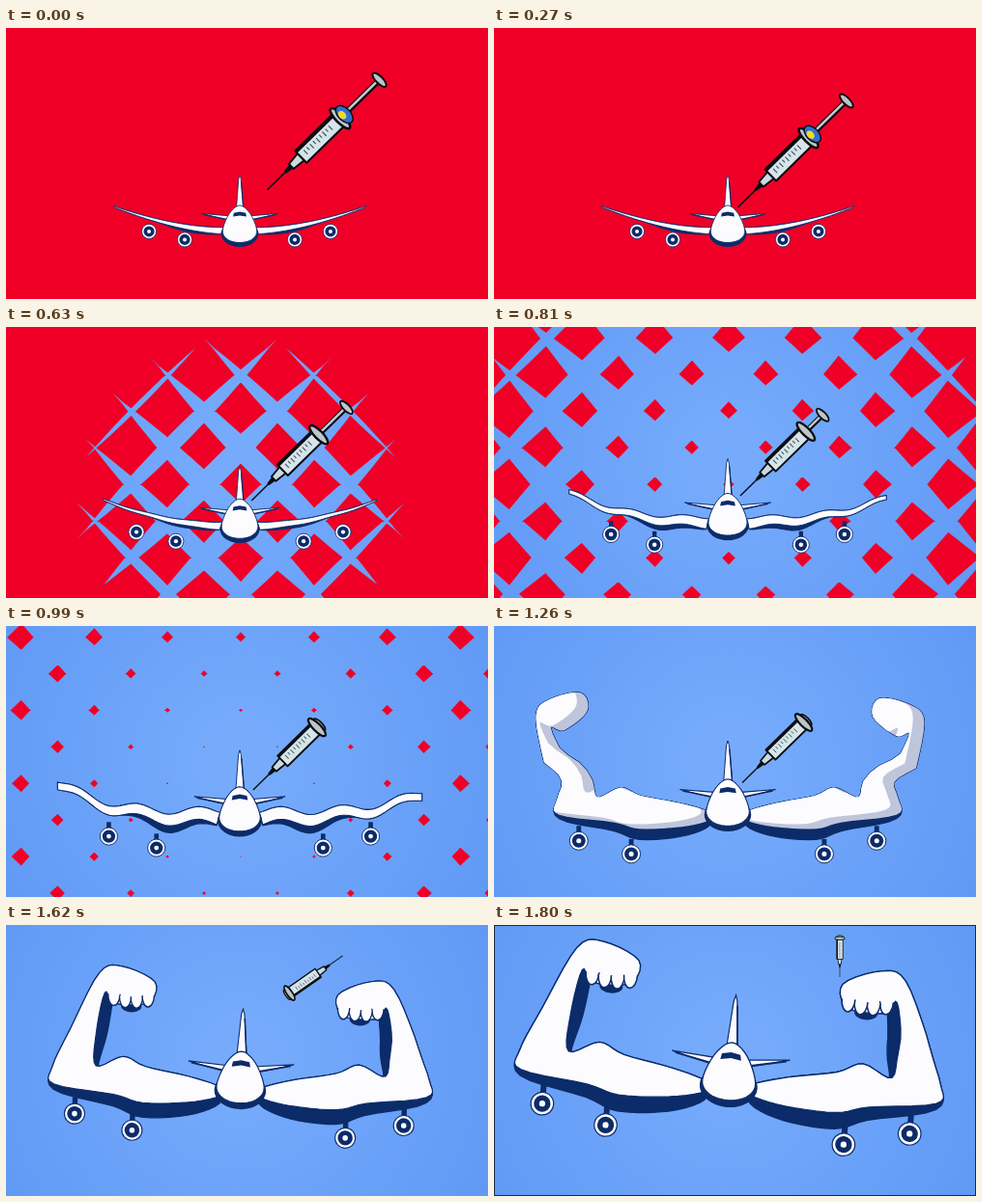
Recreate the animation shown at these times as an HTML page with a canvas. Size 499 by 281 pixels, loop 1890 ms.

```html
<!DOCTYPE html>
<html lang="en">
<head>
<meta charset="utf-8">
<title>Plane gets a boost</title>
<style>
html, body { margin: 0; width: 100%; height: 100%; overflow: hidden; background: #f00026; }
canvas { display: block; }
</style>
</head>
<body>
<canvas id="stage" width="499" height="281"></canvas>
<script>
const W = 499, H = 281, LOOP = 1890, STEP = 90;
const RED = '#f00026', NAVY = '#0c2b69', WHITE = '#fcfcff', GREY = '#bfc5da', INK = '#0a0d12';
const ctx = document.getElementById('stage').getContext('2d');

const sky = ctx.createRadialGradient(243, 140, 30, 243, 140, 290);
sky.addColorStop(0, '#76abfc');
sky.addColorStop(1, '#6099f5');

const clamp = (v, a = 0, b = 1) => Math.min(b, Math.max(a, v));
const mix = (a, b, k) => a + (b - a) * k;
const ramp = (t, from, to) => clamp((t - from) / (to - from));
const bump = (f, from, to) => Math.sin(Math.PI * ramp(f, from, to));
const rad = deg => deg * Math.PI / 180;

// Closed Catmull-Rom curve through the points, as a dense polygon
function smooth(pts, parts = 5) {
  const n = pts.length, out = [];
  for (let i = 0; i < n; i++) for (let k = 0; k < parts; k++) {
    const u = k / parts;
    const [a, b, c, d] = [-1, 0, 1, 2].map(o => pts[(i + o + n) % n]);
    out.push([0, 1].map(j => b[j] + u / 2 * (c[j] - a[j] +
      u * (2 * a[j] - 5 * b[j] + 4 * c[j] - d[j] + u * (3 * (b[j] - c[j]) + d[j] - a[j])))));
  }
  return out;
}

const ARM = smooth([
  [-20, 9], [-50, 0], [-92, -8], [-114, -17], [-140, -7],   // shoulder, biceps, inner elbow
  [-141, -38], [-134, -78], [-124, -68], [-92, -70],        // forearm, fist
  [-86, -90], [-118, -104], [-140, -97], [-166, -42],
  [-182, -5], [-180, 12], [-122, 20], [-94, 27], [-50, 25], [-20, 18]
]);
const HULL = smooth([[0, -26], [14, -15], [23, 8], [16, 20], [0, 24], [-16, 20], [-23, 8], [-14, -15]]);

function paint(fill, line, width = 1) {
  if (fill) { ctx.fillStyle = fill; ctx.fill(); }
  if (line) { ctx.strokeStyle = line; ctx.lineWidth = width; ctx.stroke(); }
}

function poly(pts, fill, line, width) {
  ctx.beginPath();
  pts.forEach(p => ctx.lineTo(...p));
  ctx.closePath();
  paint(fill, line, width);
}

function oval(x, y, rx, ry, fill, line, width, end = 2 * Math.PI) {
  ctx.beginPath();
  ctx.ellipse(x, y, rx, ry, 0, 0, end);
  paint(fill, line, width);
}

function stroke(x1, y1, x2, y2, color, width) {
  ctx.beginPath();
  ctx.moveTo(x1, y1);
  ctx.lineTo(x2, y2);
  paint(null, color, width);
}

// Diagonal bands swell from the middle until only red diamonds, then none, are left
function drawBackground(t) {
  const p = Math.max(0, (t - 500) / 490);
  ctx.fillStyle = p > 1.35 ? sky : RED;
  ctx.fillRect(0, 0, W, H);
  if (p === 0 || p > 1.35) return;

  const cell = 37.7, parts = 4, step = cell / parts;
  const base = cell * Math.max(0, 1 - p) ** 2, grow = mix(.0008, .00017, p);
  const half = (x, y) => {
    const d2 = (x - 243) ** 2 + (y - 181) ** 2;
    return (cell - clamp(base + grow * d2, 0, cell)) / 2;
  };
  ctx.beginPath();
  for (let i = -8; i < 8; i++) for (let j = -2; j < 10; j++) {
    if ((i + j) % 2 === 0) continue;
    for (const dir of [-1, 1]) for (let k = 0; k < parts; k++) {
      const x = 243 + i * cell + k * step, y = 12.5 + j * cell + dir * k * step;
      const x2 = x + step, y2 = y + dir * step;
      const a = half(x, y), b = half(x2, y2);
      if (a + b === 0) continue;
      ctx.moveTo(x - dir * a, y + a);
      ctx.lineTo(x2 - dir * b, y2 + b);
      ctx.lineTo(x2 + dir * b, y2 - b);
      ctx.lineTo(x + dir * a, y - a);
      ctx.closePath();
    }
  }
  paint(sky);
}

// Wing outline: f runs once around it, u from root to tip
function wingPoint(f, t, side) {
  const melt = ramp(t, 600, 990), u = 1 - Math.abs(1 - 2 * f);
  const lift = mix(33, side > 0 ? 25 : 38, melt);
  const mid = 8 - lift * u ** mix(1.7, 3, melt)
    + 4.5 * melt * Math.sin(17 * u + 2.5 + (t - 990) / 200);
  const thick = mix(mix(4.5, .6, u), mix(7.5, 4, u), melt);
  return [-22 - mix(149, 184, melt) * u, mid + (f < .5 ? -thick : thick)];
}

// The forearm swings in around the elbow
function armPoint([x, y], swing, side) {
  const k = ramp(-y, 20, 50), a = rad(36 * swing * k);
  const dx = x + 165, dy = y - 5;
  return [
    -165 + dx * Math.cos(a) + dy * Math.sin(a) - (side > 0 ? 5 * k : 0),
    5 - dx * Math.sin(a) + dy * Math.cos(a) + (side > 0 ? 6 * k : 0)
  ];
}

function drawEngine(x, y, stem) {
  if (stem) stroke(-x, y - 16, -x, y - 8, NAVY, 5);
  oval(-x, y, 9.8, 9.8, WHITE, NAVY, 1);
  oval(-x, y, 7.2, 7.2, NAVY);
  oval(-x, y, 2.6, 2.6, WHITE);
}

function drawFist(side) {
  const shift = side > 0 ? 5 : 0;
  for (let n = 0; n < 4; n++) {
    oval(-125 + 11 * n - shift, -77 + shift + 2 * Math.sin(n), 5.8, 11, WHITE, NAVY, 1.3, Math.PI);
  }
}

function drawLimb(t, side) {
  const morph = ramp(t, 990, 1260), flex = ramp(t, 1260, 1440), spread = ramp(t, 450, 1260);
  const drop = mix(3, 14, ramp(t, 630, 1440));
  ctx.save();
  ctx.scale(-side, 1);
  drawEngine(mix(74, 103, spread), mix(20, 54, spread), t > 720);
  drawEngine(mix(122, 159, spread), mix(9, 40, spread), t > 720);

  const pts = ARM.map((p, i) => {
    const f = i / ARM.length;
    const wing = wingPoint(f, t, side), arm = armPoint(p, 1 - flex, side);
    return [mix(wing[0], arm[0], morph), mix(wing[1], arm[1], morph)];
  });
  const under = pts.map(([x, y], i) => {
    const f = i / ARM.length;
    return [x + 11 * flex * bump(f, .2, .36), y + drop * bump(f, .7, 1)];
  });
  if (flex === 1) oval(-108 - 5 * (side > 0), -66 + 5 * (side > 0), 10, 6, NAVY);
  poly(under, NAVY, NAVY, 1.2);
  poly(pts, WHITE, NAVY, 1.1);

  const shade = morph * (1 - flex);
  if (shade) {
    ctx.save();
    ctx.clip();
    ctx.globalAlpha = shade;
    ctx.fillStyle = GREY;
    ctx.fillRect(-260, -160, 260, 260);
    poly(pts.map(([x, y]) => [x + 12 * side, y - 5]), WHITE);
    ctx.restore();
  }
  if (flex === 1) drawFist(side);
  ctx.restore();
}

function drawPlane(t) {
  const rise = ramp(t, 450, 1260), away = ramp(t, 1260, 1800), swell = away ** 2;
  const size = .77 + .2 * ramp(t, 450, 1150) + .23 * swell;
  ctx.save();
  ctx.translate(242 + 2 * swell, 204 - 20 * rise - 31 * (1 - (1 - away) ** 1.5));
  ctx.rotate(rad(4.7 * swell));
  ctx.scale(size, size);
  for (const side of [-1, 1]) {
    poly([[side * 51, -15], [side * 15, -12], [side * 15, -6], [side * 32, -10]], WHITE, NAVY, 1.1);
    stroke(side * 48, -13.5, side * 16, -7, NAVY, 1.6);
  }
  poly([[-4.5, -22], [-1.5, -62], [0, -67], [1.5, -62], [5, -22]], WHITE, NAVY, 1);
  stroke(2, -58, 4.6, -24, NAVY, 1.4);
  drawLimb(t, -1);
  drawLimb(t, 1);
  oval(0, 12, 25, 18, NAVY);
  poly(HULL, WHITE, NAVY, 1.1);
  poly([[-8, -16], [0, -17.5], [8, -16], [9, -11], [0, -12.5], [-9, -11]], NAVY);
  ctx.restore();
}

function drawSyringe(t) {
  const enter = 1 - ramp(t, 0, 270), away = ramp(t, 1260, 1800);
  const size = 1 - .16 * ramp(t, 0, 1260) - .46 * away ** 2;
  ctx.save();
  ctx.translate(287 + 19 * enter + 71 * away ** 1.7,
    152 - 19 * enter - 19 * ramp(t, 450, 1260) - 98 * (1 - (1 - away) ** 1.7));
  ctx.rotate(rad(-44.5 + 314.5 * away ** 1.25));
  ctx.scale(size, size);
  ctx.translate(-50, 0);
  ctx.lineJoin = 'round';

  const end = 110 + 53 * (1 - ramp(t, 270, 990) ** 2);
  stroke(100, 0, end, 0, INK, 6);
  stroke(102, -.6, end, -.6, '#c4cbd0', 2.6);
  oval(end, 0, 3.6, 9.5, '#bcc6ca', INK, 2);

  stroke(0, 0, 33, 0, INK, 1.6);
  poly([[26, -1.5], [36, -3], [36, 3], [26, 1.5]], INK);
  poly([[35, -3.5], [50, -5], [50, 5], [35, 3.5]], '#c9dbe2', INK, 2);
  poly([[49, -8.5], [104, -8.5], [104, 8.5], [49, 8.5]], '#d5e5ea', INK, 2.2);
  stroke(49, -7, 104, -7, INK, 3);
  for (let n = 0; n < 9; n++) stroke(56 + n * 4.5, -3, 56 + n * 4.5, n % 2 ? 1 : 3, '#3b4a52', 1.1);
  oval(106, 0, 4.5, 14, '#bcc6ca', INK, 2.6);
  if (t < 540) {
    oval(112, 0, 6.5, 11, '#2f6fd0', INK, 1.4);
    oval(110, -1, 3.5, 5, '#f2d928');
  }
  ctx.restore();
}

function render(now) {
  const t = Math.floor(now % LOOP / STEP) * STEP;
  const layers = [drawPlane, drawSyringe];
  if (t > 1260) layers.reverse();
  drawBackground(t);
  layers.forEach(draw => draw(t));
  if (t > 1620) {
    ctx.strokeStyle = '#16294a';
    ctx.lineWidth = 1;
    ctx.strokeRect(.5, .5, W - 1, H - 1);
  }
  requestAnimationFrame(render);
}
render(performance.now());
</script>
</body>
</html>
```
